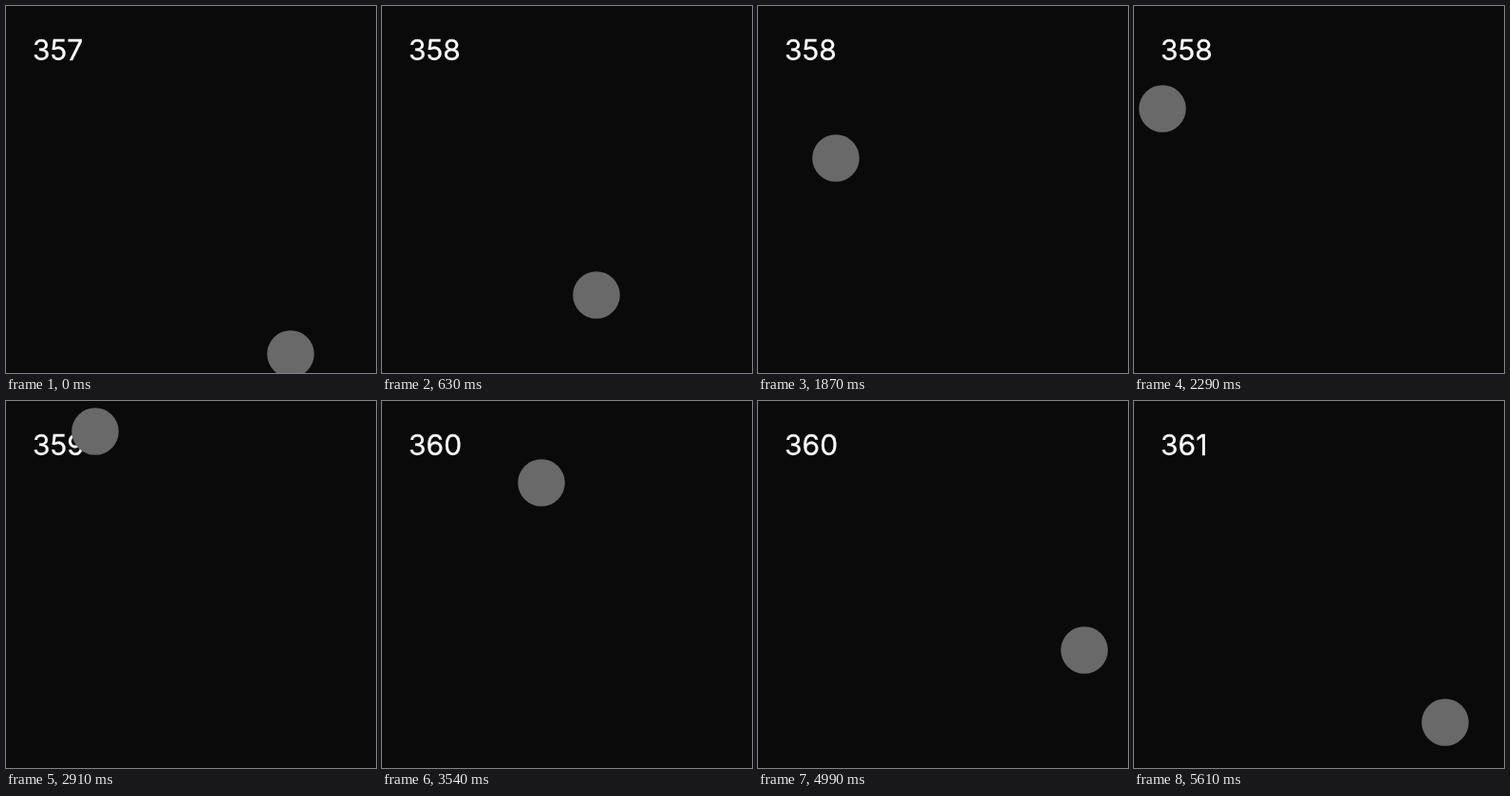
These frames come from a looping animation (390 by 386 pixels, 5710 ms). An HTML page:

```html
<!DOCTYPE html>
<html lang="en">
<head>
<meta charset="utf-8">
<title>Bouncing ball</title>
<style>
  html, body { margin: 0; width: 100%; height: 100%; overflow: hidden; background: #0a0a0a; }
  svg { display: block; }
  text { font: 30px Inter, sans-serif; fill: #fff; stroke: #fff; stroke-width: .3px; }
</style>
</head>
<body>
<svg width="390" height="386" viewBox="0 0 390 386">
  <text id="count" x="28" y="57.3">357</text>
  <circle id="ball" r="24.8" fill="#696969"/>
</svg>
<script>
const LOOP = 5710, STEP = 207.8, LEAD = 7;
const RANGE = 350;                      // travel between opposite walls
const BOUNCES = [6, 276, 356, 626];     // distance at each wall hit

// [step, distance]: nearly constant speed, slightly uneven
const PACE = [[0, 0], [5, 122], [6, 148], [9, 218], [11, 270], [14, 346],
              [17, 420], [21, 520], [23, 570], [27, 672]];

const ball = document.getElementById('ball');
const count = document.getElementById('count');

function distance(step) {
  const i = Math.max(1, PACE.findIndex(([k]) => k >= step));
  const [k0, d0] = PACE[i - 1], [k1, d1] = PACE[i];
  return 2 * Math.round((d0 + (d1 - d0) * (step - k0) / (k1 - k0)) / 2);
}

// Triangle wave: 0 at d = 0, RANGE at d = ±RANGE
const fold = d => RANGE - Math.abs(Math.abs(d) - RANGE);

function draw(now) {
  const d = distance(Math.floor((now % LOOP + LEAD) / STEP));
  ball.setAttribute('cx', 24 + fold(d - 276));
  ball.setAttribute('cy', 22 + fold(d - 356));
  count.textContent = 357 + BOUNCES.filter(b => d >= b).length;
}

const start = performance.now();
function tick() {
  draw(performance.now() - start);
  requestAnimationFrame(tick);
}
tick();
</script>
</body>
</html>
```
